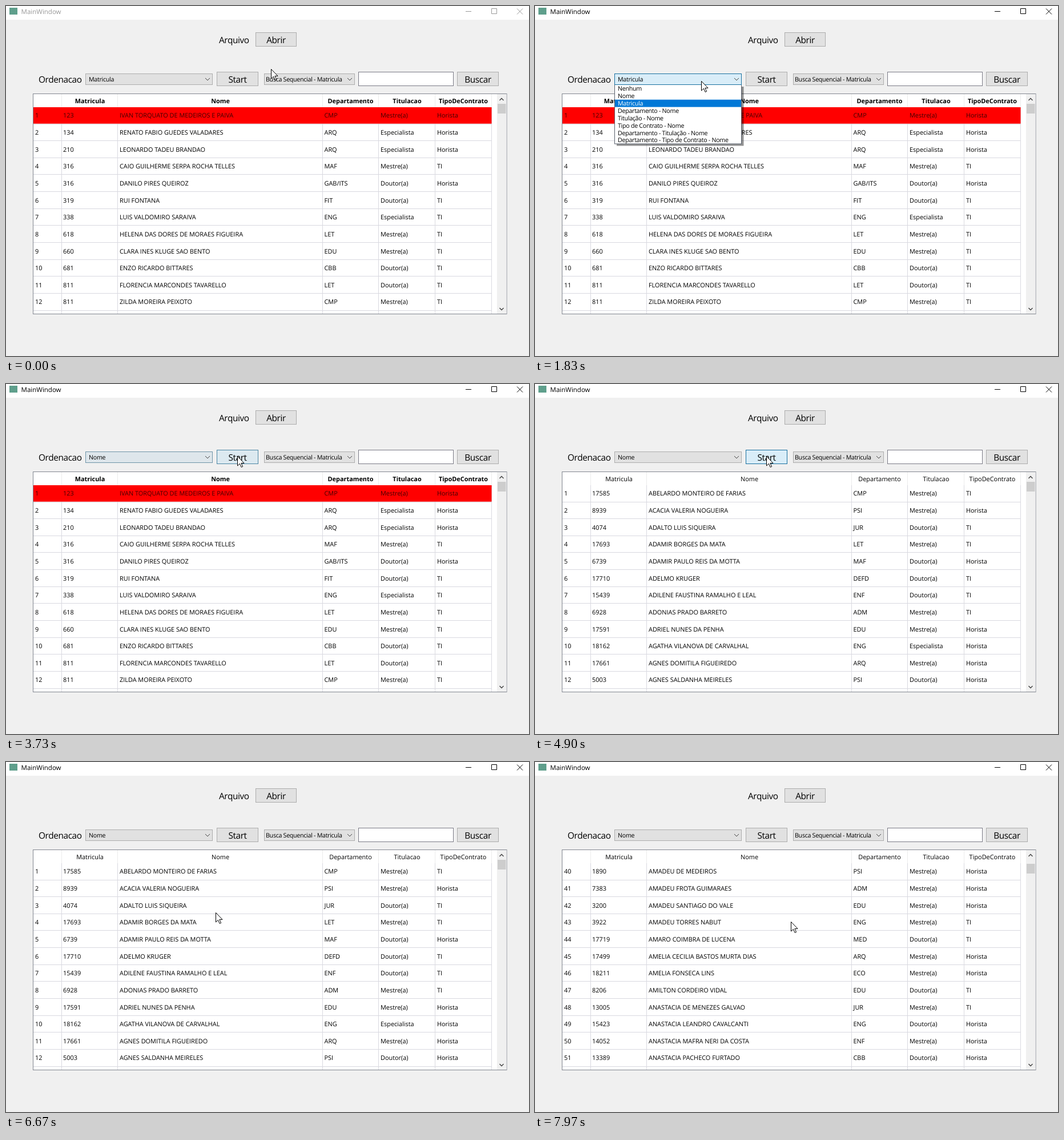
Animation of 916x612 px, one loop 8 s. Source, as an HTML page:

```html
<!DOCTYPE html>
<html lang="pt">
<head>
<meta charset="utf-8">
<title>MainWindow</title>
<style>
  html, body { margin: 0; width: 100%; height: 100%; overflow: hidden; background: #f0f0f0; }
  svg { display: block; width: 916px; height: 612px; }
  text { font: 10.9px "Open Sans", "Noto Sans", sans-serif; text-rendering: geometricPrecision; white-space: pre; }
  .title { font-size: 11.5px; }
  .big { font-size: 15.4px; letter-spacing: -.4px; }
  .combo { font-size: 10.7px; letter-spacing: -.3px; }
  .mid { text-anchor: middle; }
  .bold text { font-weight: 700; }
  .line { fill: none; stroke: #444; }
</style>
</head>
<body>
<svg id="stage" viewBox="0 0 916 612"></svg>
<script>
const LOOP = 8000;
const PITCH = 29.65, VISIBLE = 12;
const COLUMNS = [51, 100, 199, 557.5, 656, 755];
const HEADERS = [['Matricula', 147], ['Nome', 375.5], ['Departamento', 603.5], ['Titulacao', 702.5], ['TipoDeContrato', 801]];
const OPTIONS = ['Nenhum', 'Nome', 'Matricula', 'Departamento - Nome', 'Titulação - Nome', 'Tipo de Contrato - Nome',
  'Departamento - Titulação - Nome', 'Departamento - Tipo de Contrato - Nome'];
const DEGREES = { M: 'Mestre(a)', D: 'Doutor(a)', E: 'Especialista' };
const CONTRACTS = { H: 'Horista', T: 'TI' };

// Moments of the interaction, in ms
const ACTIVATE = 1050, POPUP_OPEN = 1060, POPUP_READY = 1260, PICK = 3050, SORT = 4500;
const SCROLL_START = 7270, SCROLL_END = 7940, SCROLL_TICKS = 13;

const parse = list => list.trim().split('\n').map(line => {
  const [id, name, dept, degree, contract] = line.trim().split('|');
  return [id, name, dept, DEGREES[degree], CONTRACTS[contract]];
});

const byId = parse(`
  123|IVAN TORQUATO DE MEDEIROS E PAIVA|CMP|M|H
  134|RENATO FABIO GUEDES VALADARES|ARQ|E|H
  210|LEONARDO TADEU BRANDAO|ARQ|E|H
  316|CAIO GUILHERME SERPA ROCHA TELLES|MAF|M|T
  316|DANILO PIRES QUEIROZ|GAB/ITS|D|H
  319|RUI FONTANA|FIT|D|T
  338|LUIS VALDOMIRO SARAIVA|ENG|E|T
  618|HELENA DAS DORES DE MORAES FIGUEIRA|LET|M|T
  660|CLARA INES KLUGE SAO BENTO|EDU|M|T
  681|ENZO RICARDO BITTARES|CBB|D|T
  811|FLORENCIA MARCONDES TAVARELLO|LET|D|T
  811|ZILDA MOREIRA PEIXOTO|CMP|M|T`);

const firstPage = parse(`
  17585|ABELARDO MONTEIRO DE FARIAS|CMP|M|T
  8939|ACACIA VALERIA NOGUEIRA|PSI|M|H
  4074|ADALTO LUIS SIQUEIRA|JUR|D|T
  17693|ADAMIR BORGES DA MATA|LET|M|T
  6739|ADAMIR PAULO REIS DA MOTTA|MAF|D|H
  17710|ADELMO KRUGER|DEFD|D|T
  15439|ADILENE FAUSTINA RAMALHO E LEAL|ENF|D|T
  6928|ADONIAS PRADO BARRETO|ADM|M|T
  17591|ADRIEL NUNES DA PENHA|EDU|M|H
  18162|AGATHA VILANOVA DE CARVALHAL|ENG|E|H
  17661|AGNES DOMITILA FIGUEIREDO|ARQ|M|H
  5003|AGNES SALDANHA MEIRELES|PSI|D|H`);

const lastPage = parse(`
  1890|AMADEU DE MEDEIROS|PSI|M|H
  7383|AMADEU FROTA GUIMARAES|ADM|M|H
  3200|AMADEU SANTIAGO DO VALE|EDU|M|H
  3922|AMADEU TORRES NABUT|ENG|M|T
  17719|AMARO COIMBRA DE LUCENA|MED|D|T
  17499|AMELIA CECILIA BASTOS MURTA DIAS|ARQ|M|H
  18211|AMELIA FONSECA LINS|ECO|M|H
  8206|AMILTON CORDEIRO VIDAL|EDU|D|T
  13005|ANASTACIA DE MENEZES GALVAO|JUR|M|T
  15423|ANASTACIA LEANDRO CAVALCANTI|ENG|D|H
  14052|ANASTACIA MAFRA NERI DA COSTA|ENF|M|H
  13389|ANASTACIA PACHECO FURTADO|CBB|D|H`);

let seed = 7;
const random = () => (seed = seed * 16807 % 2147483647) / 2147483647;
const pick = list => list[Math.floor(random() * list.length)];

// Rows that only flash by while the list scrolls
function middleRows() {
  const first = ['AILTON', 'ALAIR', 'ALBA', 'ALCEU', 'ALINE', 'ALMIR', 'AMABILE'];
  const middle = ['BORGES', 'CORREIA DE', 'FARIAS', 'GUEDES DA', 'MOREIRA', 'PIRES DE', 'TADEU'];
  const last = ['BARRETO', 'FONTANA', 'LUCENA', 'MEIRELES', 'NOGUEIRA', 'SIQUEIRA', 'VALADARES'];
  const names = Array.from({ length: 27 }, (_, i) => `${first[Math.floor(i * 7 / 27)]} ${pick(middle)} ${pick(last)}`);
  return names.sort().map(name => [
    Math.floor(1000 + random() * 17500), name, pick(['CMP', 'PSI', 'JUR', 'LET', 'ENG', 'EDU', 'MED']),
    DEGREES[pick(['M', 'M', 'D', 'E'])], CONTRACTS[pick(['H', 'T'])]]);
}
const byName = [...firstPage, ...middleRows(), ...lastPage];

const text = (x, y, content, attrs = '') => `<text x="${x}" y="${y}" ${attrs}>${content}</text>`;
const rect = (x, y, w, h, fill, attrs = '') => `<rect x="${x}" y="${y}" width="${w}" height="${h}" fill="${fill}" ${attrs}/>`;
const path = (d, attrs = 'class="line"') => `<path d="${d}" ${attrs}/>`;
const chevron = (x, y, dy = 4) => path(`M${x - 4} ${y - dy / 2}l4 ${dy} 4 ${-dy}`);
const button = (x, y, w, label, id = '') =>
  rect(x + .5, y + .5, w - 1, 24, '#e1e1e1', `stroke="#adadad" id="${id}"`) +
  text(x + w / 2, y + 19, label, 'class="big mid"');
const combo = (x, w, textX, label, id) =>
  rect(x + .5, 118.5, w - 1, 19, '#e1e1e1', `stroke="#adadad" id="${id}"`) +
  text(textX, 132, label, `class="combo" id="${id}Text"`) + chevron(x + w - 9, 128);

function gridPath() {
  let d = '';
  for (let i = 0; i < VISIBLE; i++) d += `M48 ${Math.round(205.5 + i * PITCH) + .5}H850.5`;
  for (const x of [97, 195, 554, 652, 751, 850]) d += `M${x + .5} 177V538`;
  return d;
}

const ITEM = 12.87, LIST_TOP = 137.5, LIST_HEIGHT = 104;
const itemTop = i => LIST_TOP + .5 + i * ITEM;

const stage = document.getElementById('stage');
stage.innerHTML =
  '<defs><clipPath id="below"><rect x="130" y="138" width="250" height="120"/></clipPath></defs>' +
  rect(0, 0, 916, 612, '#f0f0f0') + rect(0, 0, 916, 24, '#fff') +
  rect(6, 3, 14, 12, '#5f9f8c') +
  `<g id="caption">${text(26.5, 14, 'MainWindow', 'class="title"')}
    ${path('M805 9.5h10M850.5 4.5h9v9h-9zM895 4.5l10 10M905 4.5l-10 10', 'fill="none" stroke="currentColor"')}</g>` +
  text(373, 65, 'Arquivo', 'class="big"') + button(437, 46, 72, 'Abrir') +
  text(57, 134, 'Ordenacao', 'class="big"') +
  combo(139, 223, 145, 'Matricula', 'order') + button(369, 115, 73, 'Start', 'start') +
  combo(452, 159, 455, 'Busca Sequencial - Matricula', 'search') +
  rect(617.5, 115.5, 166, 24, '#fff', 'stroke="#7a7a86"') + button(790, 115, 73, 'Buscar') +
  rect(47.5, 153.5, 829.5, 385, '#fff', 'stroke="#828790"') +
  path('M97.5 154V177M195.5 154V177M554.5 154V177M652.5 154V177M751.5 154V177M850.5 154V177', 'stroke="#ececec"') +
  path(gridPath(), 'fill="none" stroke="#d9d9e0"') +
  rect(48, 177, 802.5, 28.7, '#f00', 'id="selected"') +
  `<g id="headers">${HEADERS.map(([label, x]) => text(x, 170, label, 'class="mid"')).join('')}</g><g id="rows"></g>` +
  rect(860, 154, 16.5, 384, '#f0f0f0') + rect(861, 171, 14.5, 17, '#cdcdcd', 'id="thumb"') +
  path('M864.5 165l3.5-3.5 3.5 3.5M864.5 528l3.5 3.5 3.5-3.5', 'class="line" stroke-width="1.4"') +
  `<g id="popup">${rect(143, 141, 222.5, 103.5, '#000', 'opacity=".42" id="shadow"')}
    <g clip-path="url(#below)"><g id="list">
    ${rect(139.5, LIST_TOP, 222, LIST_HEIGHT - .5, '#fff', 'stroke="#59606c"')}
    ${rect(140, 0, 221, ITEM, '#0078d7', 'id="highlight"')}
    ${OPTIONS.map((label, i) => text(145, itemTop(i) + 10.3, label, 'class="combo option"')).join('')}
    </g></g></g>` +
  path('M.5.5V17l3.9-3.7 2.8 6.2 2.4-1.1-2.7-6h5.1z', 'id="cursor" fill="#fff" stroke="#000" stroke-width="1"');

const el = Object.fromEntries([...stage.querySelectorAll('[id]')].map(node => [node.id, node]));
const options = [...stage.querySelectorAll('.option')];

const clamp = v => Math.max(0, Math.min(1, v));
const progress = (t, a, b) => clamp((t - a) / (b - a));
const smooth = v => v * v * (3 - 2 * v);
const mix = (a, b, k) => `rgb(${a.map((v, i) => Math.round(v + (b[i] - v) * k))})`;

// time, x, y
const TRACK = [[30, 464, 110], [830, 300, 128], [1000, 294, 129], [1720, 294, 129], [2480, 243, 161], [3180, 243, 161],
  [3700, 405, 126], [5800, 405, 126], [6670, 367, 263], [6950, 367, 263], [7500, 448, 279]];

function cursorAt(t) {
  const next = TRACK.findIndex(point => point[0] > t);
  if (next === 0) return TRACK[0].slice(1);
  if (next < 0) return TRACK[TRACK.length - 1].slice(1);
  const [t0, x0, y0] = TRACK[next - 1], [t1, x1, y1] = TRACK[next];
  const k = smooth(progress(t, t0, t1));
  return [x0 + (x1 - x0) * k, y0 + (y1 - y0) * k];
}

function tint(node, amount) {
  node.setAttribute('fill', mix([225, 225, 225], [217, 237, 248], amount));
  node.setAttribute('stroke', mix([173, 173, 173], [24, 112, 160], amount));
}

let shown = '';
function showRows(sorted, first) {
  const key = `${sorted}:${first}`;
  if (key === shown) return;
  shown = key;
  const page = (sorted ? byName : byId).slice(first, first + VISIBLE);
  el.rows.innerHTML = page.map((row, i) => {
    const fill = !sorted && i === 0 ? 'fill="#400000"' : '';
    return [first + i + 1, ...row].map((cell, c) => text(COLUMNS[c], 195.3 + i * PITCH, cell, fill)).join('');
  }).join('');
}

function showPopup(t, y) {
  const open = t >= POPUP_OPEN && t < PICK, ready = t >= POPUP_READY;
  el.popup.style.display = open ? '' : 'none';
  if (!open) return;
  const slide = (progress(t, POPUP_OPEN, POPUP_READY) - 1) * LIST_HEIGHT;
  el.list.setAttribute('transform', `translate(0 ${slide})`);
  el.shadow.style.display = ready ? '' : 'none';
  const active = y > LIST_TOP ? Math.floor((y - LIST_TOP) / ITEM) : 2;
  el.highlight.setAttribute('y', itemTop(active));
  el.highlight.setAttribute('fill', ready ? '#0078d7' : '#f4f4ec');
  options.forEach((node, i) => node.setAttribute('fill', ready && i === active ? '#fff' : '#000'));
}

function render(t) {
  const [x, y] = cursorAt(t);
  el.cursor.setAttribute('transform', `translate(${Math.round(x)} ${Math.round(y)})`);

  const ink = t < ACTIVATE ? '#999' : '#000';
  el.caption.setAttribute('fill', ink);
  el.caption.setAttribute('color', ink);

  tint(el.order, progress(t, 700, 900) - progress(t, 3350, 4000));
  tint(el.start, progress(t, 3600, 3800) - progress(t, 5850, 6050));
  el.orderText.textContent = t < PICK ? 'Matricula' : 'Nome';
  showPopup(t, y);

  const sorted = t >= SORT;
  const ticks = t < SCROLL_START ? 0 : Math.min(SCROLL_TICKS, 1 + Math.floor(progress(t, SCROLL_START, SCROLL_END) * (SCROLL_TICKS - 1)));
  el.selected.style.display = sorted ? 'none' : '';
  el.headers.setAttribute('class', sorted ? '' : 'bold');
  showRows(sorted, ticks * 3);
  el.thumb.setAttribute('y', 171 + 7 * ticks / SCROLL_TICKS);
}

const began = performance.now();
function frame() {
  render((performance.now() - began) % LOOP);
  requestAnimationFrame(frame);
}
frame();
</script>
</body>
</html>
```
